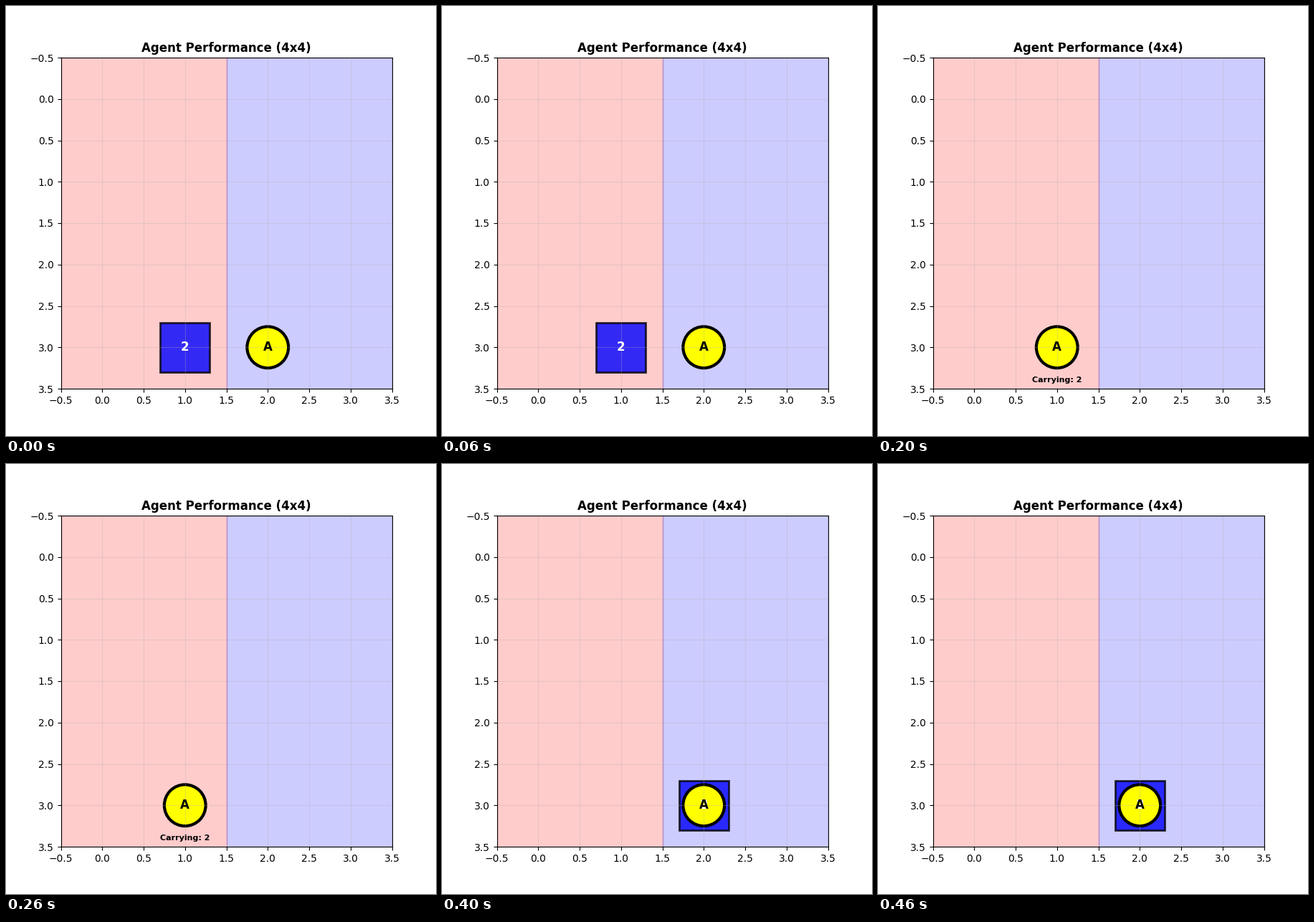
Recreate the animation shown at these times as a matplotlib script. Size 600 by 600 pixels, loop 500 ms.

```python
import matplotlib.pyplot as plt
from matplotlib.animation import FuncAnimation
from matplotlib.patches import Circle, Rectangle

ROW = 3
SIDE = 0.6
# agent column, box column, whether the box is being carried
STEPS = [(2, 1, False), (1, 1, False), (1, 1, True), (2, 2, True), (2, 2, False)]

plt.rcParams["font.family"] = "DejaVu Sans"
fig, ax = plt.subplots(figsize=(6, 6), dpi=100)
ax.set_xlim(-0.5, 3.5)
ax.set_ylim(3.5, -0.5)
ax.set_aspect("equal")
ax.grid(True, alpha=0.3)
ax.set_title("Agent Performance (4x4)", fontsize=12, fontweight="bold")

ax.axvspan(-0.5, 1.5, color="red", alpha=0.2)
ax.axvspan(1.5, 3.5, color="blue", alpha=0.2)


def label(text, y, size, color="black"):
    return ax.text(0, y, text, ha="center", va="center",
                   fontsize=size, fontweight="bold", color=color)


box = ax.add_patch(Rectangle((0, ROW - SIDE / 2), SIDE, SIDE, facecolor="blue",
                             edgecolor="black", linewidth=2, alpha=0.8))
box_label = label("2", ROW, 12, "white")
agent = ax.add_patch(Circle((0, ROW), 0.25, facecolor="yellow",
                            edgecolor="black", linewidth=3))
agent_label = label("A", ROW, 12)
cargo_label = label("Carrying: 2", ROW + 0.4, 8)


def update(i):
    agent_x, box_x, carried = STEPS[i]
    agent.center = (agent_x, ROW)
    agent_label.set_x(agent_x)
    cargo_label.set_x(agent_x)
    box.set_x(box_x - SIDE / 2)
    box_label.set_x(box_x)
    for part in (box, box_label):
        part.set_visible(not carried)
    cargo_label.set_visible(carried)
    return box, box_label, agent, agent_label, cargo_label


anim = FuncAnimation(fig, update, frames=len(STEPS), interval=100,
                     init_func=lambda: update(0), repeat=True)
plt.show()
```
